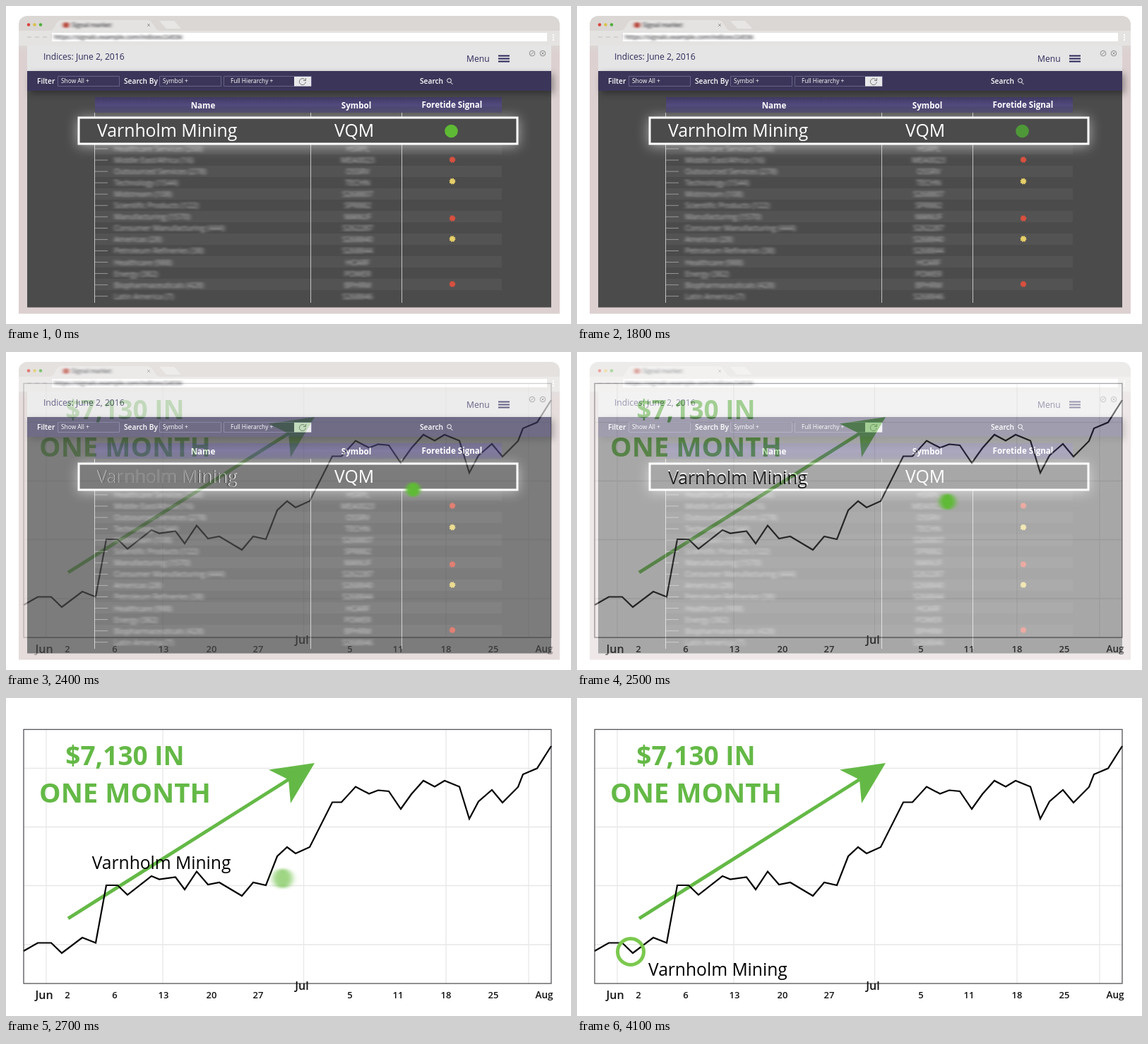
An HTML page for the animation above (4200 ms loop, 800 by 450 pixels).

```html
<!DOCTYPE html>
<html lang="en">
<head>
<meta charset="utf-8">
<title>Signal to chart</title>
<style>
  html, body { margin: 0; width: 100%; height: 100%; overflow: hidden; background: #fff; }
  svg { display: block; width: 800px; height: 450px; font-family: "Open Sans", "Noto Sans", sans-serif; }
  .mid { text-anchor: middle; }
  .semi { font-weight: 600; }
  .bold { font-weight: 700; }
  .line { fill: none; }
  .nav { fill: #3b3659; filter: drop-shadow(4px 4px 5px #0005); }
  .highlight { filter: drop-shadow(0 2px 9px #fff8); }
</style>
</head>
<body>
<svg viewBox="0 0 800 450">
  <defs>
    <linearGradient id="frame" x2="0" y2="1">
      <stop offset=".09" stop-color="#dad7d4"/><stop offset=".13" stop-color="#ddd0d0"/>
    </linearGradient>
    <linearGradient id="head" x2="0" y2="1">
      <stop stop-color="#3f3963"/><stop offset=".5" stop-color="#514a7d"/><stop offset="1" stop-color="#3f3b5c"/>
    </linearGradient>
    <filter id="smear" x="-10%" y="-50%" width="120%" height="200%"><feGaussianBlur stdDeviation="2.4 .9"/></filter>
    <filter id="motion" x="-100%" y="-50%" width="300%" height="200%"><feGaussianBlur id="motionBlur" stdDeviation="0"/></filter>
  </defs>

  <g id="browser">
    <path d="M18 435.500V26a12 12 0 0 1 12-12H772a12 12 0 0 1 12 12V435.500Z" fill="url(#frame)"/>
    <path d="M18 35H62C70 35 70 20 78 20H200C209 20 210 35 218 35H784V56H18Z" fill="#e5e3e1"/>
    <path d="M217 21H238L248 32H227Z" fill="#e8e6e4"/>
    <circle cx="32" cy="26.500" r="2.200" fill="#d8433a"/>
    <circle cx="40.500" cy="26.500" r="2.200" fill="#d9c04a"/>
    <circle cx="49" cy="26.500" r="2.200" fill="#4fae3c"/>
    <path d="M200 25l4 4m0-4l-4 4" stroke="#888" stroke-width=".8"/>
    <path d="M30 44h6m5 0h6m5 0h6" stroke="#d3d0ce" stroke-width="2"/>
    <rect x="65" y="38" width="701" height="12" fill="#fff"/>
    <path d="M775 40v9" stroke="#fff" stroke-width="2" stroke-dasharray="2 1.500"/>
    <g filter="url(#smear)" fill="#3d3d42">
      <circle cx="85" cy="27" r="4" fill="#b3372c"/>
      <text x="93" y="30" font-size="8.500" class="semi">Signal market</text>
      <text x="68" y="47" font-size="8.800" class="semi">https://signals.example.com/indices/24536</text>
    </g>

    <rect x="30" y="56" width="742" height="370.500" fill="#4b4b4b"/>
    <rect x="30" y="56" width="742" height="36" fill="#e5e5e6"/>
    <rect class="nav" x="30" y="92" width="742" height="28"/>
    <g fill="#2d2958" font-size="12.100">
      <text x="53" y="76">Indices: June 2, 2016</text>
      <text x="652" y="79">Menu</text>
    </g>
    <path d="M697 70.500h16m-16 4h16m-16 4h16" stroke="#2d2958" stroke-width="1.800"/>
    <g class="line" stroke="#777" stroke-width=".8">
      <circle cx="745" cy="67" r="3.800"/><path d="M743 68.500l4-3"/>
      <circle cx="760" cy="67" r="3.800"/><path d="M758.500 65.500l3 3m0-3l-3 3"/>
    </g>
    <g class="line" stroke="#65618a">
      <path d="M73.500 99.500h87v14h-87zM217.500 99.500h87v14h-87zM308.500 99.500h124v14h-124z"/>
    </g>
    <g fill="#fff" font-size="10.200" class="semi">
      <text x="44" y="110">Filter</text>
      <text x="167" y="110">Search By</text>
      <text x="586" y="110">Search</text>
    </g>
    <g fill="#fff" font-size="8.400">
      <text x="78" y="109">Show All +</text>
      <text x="222" y="109">Symbol +</text>
      <text x="318" y="109">Full Hierarchy +</text>
    </g>
    <rect x="408" y="100" width="24" height="13.500" fill="#e8e8ea"/>
    <path class="line" d="M423.500 104.500a4.500 4.500 0 1 0 .8 3M424.500 102v3.500h-3.500" stroke="#777"/>
    <g class="line" stroke="#fff"><circle cx="627.500" cy="105.500" r="2.900"/><path d="M629.500 108l3 3"/></g>

    <g id="stripes" fill="#535353"></g>
    <rect x="126" y="129" width="576" height="22" fill="url(#head)"/>
    <g fill="#fff" font-size="11.600" class="mid bold">
      <text x="279" y="144.500">Name</text>
      <text x="496" y="144.500">Symbol</text>
      <text x="631.500" y="143.500">Foretide Signal</text>
    </g>
    <path id="ticks" stroke="#a0a0a0" stroke-width=".9"/>
    <path d="M125.500 151V420M431.500 151V420M560.500 151V420" stroke="#c4c4c4"/>
    <g id="rows" fill="#c2c2c2" font-size="10.800" filter="url(#smear)"></g>
    <g id="signals"></g>
    <rect class="highlight" x="103" y="158" width="621" height="37" fill="#4b4b4b" stroke="#fff" stroke-width="3"/>
    <g fill="#fff" font-size="24.800">
      <text x="129" y="185">Varnholm Mining</text>
      <text x="465" y="185">VQM</text>
    </g>
  </g>

  <g id="chart">
    <rect width="800" height="450" fill="#fff"/>
    <path d="M57 45V404M222 45V404M421.500 45V404M623 45V404M740 45V404M25 99.500H772M25 182.500H772M25 265.500H772M25 349H772" stroke="#e8e8e8" stroke-width="1.300"/>
    <rect class="line" x="25" y="44.500" width="747" height="359.500" stroke="#55555a" stroke-width="1.300"/>
    <g fill="#64b946">
      <path d="M88 312L403 113.500" stroke="#64b946" stroke-width="5"/>
      <path d="M437 92L372 101.500L400 115.500L403 149Z"/>
      <g class="mid bold">
        <text x="168.500" y="95" font-size="37">$7,130 IN</text>
        <text x="168.500" y="148" font-size="38.400">ONE MONTH</text>
      </g>
    </g>
    <polyline class="line" stroke="#000" stroke-width="2.200" points="25,358 45,346.500 64,346.500 79,361 108,339 127,346.500 142,265 158,265 172,278.500 206,252 217,256.500 240,253.500 253,271 270,245.500 286,264 302,261 334,280 350,261 368,265 384,224 398,211 410,220 430,211 462,147.500 475,147.500 495,125.500 514,135.500 527,130.500 542,132 559,157 574,136 591,117 607,125.500 621,117 642,125.500 656,171 669,146.500 688,130 703,148 725,126 732,108 752,99.500 772,68"/>
    <g id="axis" class="mid semi" fill="#111"></g>
  </g>

  <text id="label" font-size="24.600">Varnholm Mining</text>
  <g filter="url(#motion)"><circle id="dot"/><circle id="ring" fill="none" stroke="#7bc94f" stroke-width="5"/></g>
</svg>

<script>
const $ = id => document.getElementById(id);
const clamp = x => Math.min(1, Math.max(0, x));
const ramp = (t, from, to) => clamp((t - from) / (to - from));
const ease = x => x * x * (3 - 2 * x);
const mix = (a, b, k) => a + (b - a) * k;

function add(parent, tag, attrs, text = '') {
  const el = document.createElementNS('http://www.w3.org/2000/svg', tag);
  set(el, attrs);
  el.textContent = text;
  parent.append(el);
}
function set(el, attrs) {
  for (const key in attrs) el.setAttribute(key, attrs[key]);
}

const rows = [
  ['Healthcare Services (268)', 'HSRPL'], ['Middle East/Africa (16)', 'MEA0023'],
  ['Outsourced Services (278)', 'OSSRV'], ['Technology (1544)', 'TECHN'],
  ['Midstream (108)', 'S268807'], ['Scientific Products (122)', 'SPR882'],
  ['Manufacturing (1570)', 'MANUF'], ['Consumer Manufacturing (444)', 'S262287'],
  ['Americas (28)', 'S268840'], ['Petroleum Refineries (38)', 'S268844'],
  ['Healthcare (988)', 'HCARF'], ['Energy (382)', 'POWER'],
  ['Biopharmaceuticals (428)', 'BPHRM'], ['Latin America (7)', 'S268846']
];
let ticks = '';
rows.forEach(([name, symbol], i) => {
  const y = 202 + i * 16.05;
  add($('rows'), 'text', { x: 153, y: y + 4 }, name);
  add($('rows'), 'text', { x: 498, y: y + 4, class: 'mid' }, symbol);
  if (i % 2 === 0) add($('stripes'), 'rect', { x: 126, y: 194 + i * 16, width: 576, height: 16 });
  ticks += `M126 ${y}h18`;
});
set($('ticks'), { d: ticks });

for (const [y, color] of [[217.5, '#d9503f'], [248, '#e6cf68'], [300.5, '#d9503f'], [329.5, '#e6cf68'], [393.5, '#d9503f']])
  add($('signals'), 'circle', { cx: 632, cy: y, r: 3.6, fill: color, stroke: color, 'stroke-width': 1.6, 'stroke-dasharray': '1.6 1.2' });

for (const [x, text, size = 13, y = 425] of [
  [54, 'Jun', 16, 426], [87, '2'], [154, '6'], [223, '13'], [291, '20'], [357, '27'],
  [419, 'Jul', 16, 413], [487, '5'], [555, '11'], [623, '18'], [690, '25'], [762, 'Aug', 13.6]
]) add($('axis'), 'text', { x, y, 'font-size': size }, text);

const travel = t => ease(ramp(t, 2179, 3330));

function draw(t) {
  const fade = ramp(t, 2290, 2700);
  set($('chart'), { opacity: fade });
  set($('browser'), { visibility: fade < 1 ? 'visible' : 'hidden' });

  const drop = ease(ramp(t, 2460, 3160));
  set($('label'), { x: mix(129.5, 101, drop), y: mix(185, 393, drop), opacity: ramp(t, 2280, 2540) });

  const p = travel(t);
  const speed = 555 * (travel(t + 5) - travel(t - 5)) / 10;
  const at = { cx: mix(630.5, 76, p), cy: mix(177, 359, p) };
  const glow = 1 - ramp(t, 0, 1000) + ramp(t, 2000, 2350);
  const fill = `rgb(${mix(78, 94, glow)}, ${mix(152, 186, glow)}, ${mix(56, 52, glow)})`;
  set($('dot'), { ...at, r: mix(9.3, 19, p), fill, opacity: clamp(1.35 - 1.75 * p) });
  set($('ring'), { ...at, r: mix(7, 18.5, p), opacity: ramp(p, 0.35, 0.75) });
  set($('motionBlur'), { stdDeviation: `${speed * 6} ${speed * 2}` });
}

function tick(now) {
  draw(now % 4200);
  requestAnimationFrame(tick);
}
draw(0);
requestAnimationFrame(tick);
</script>
</body>
</html>
```
